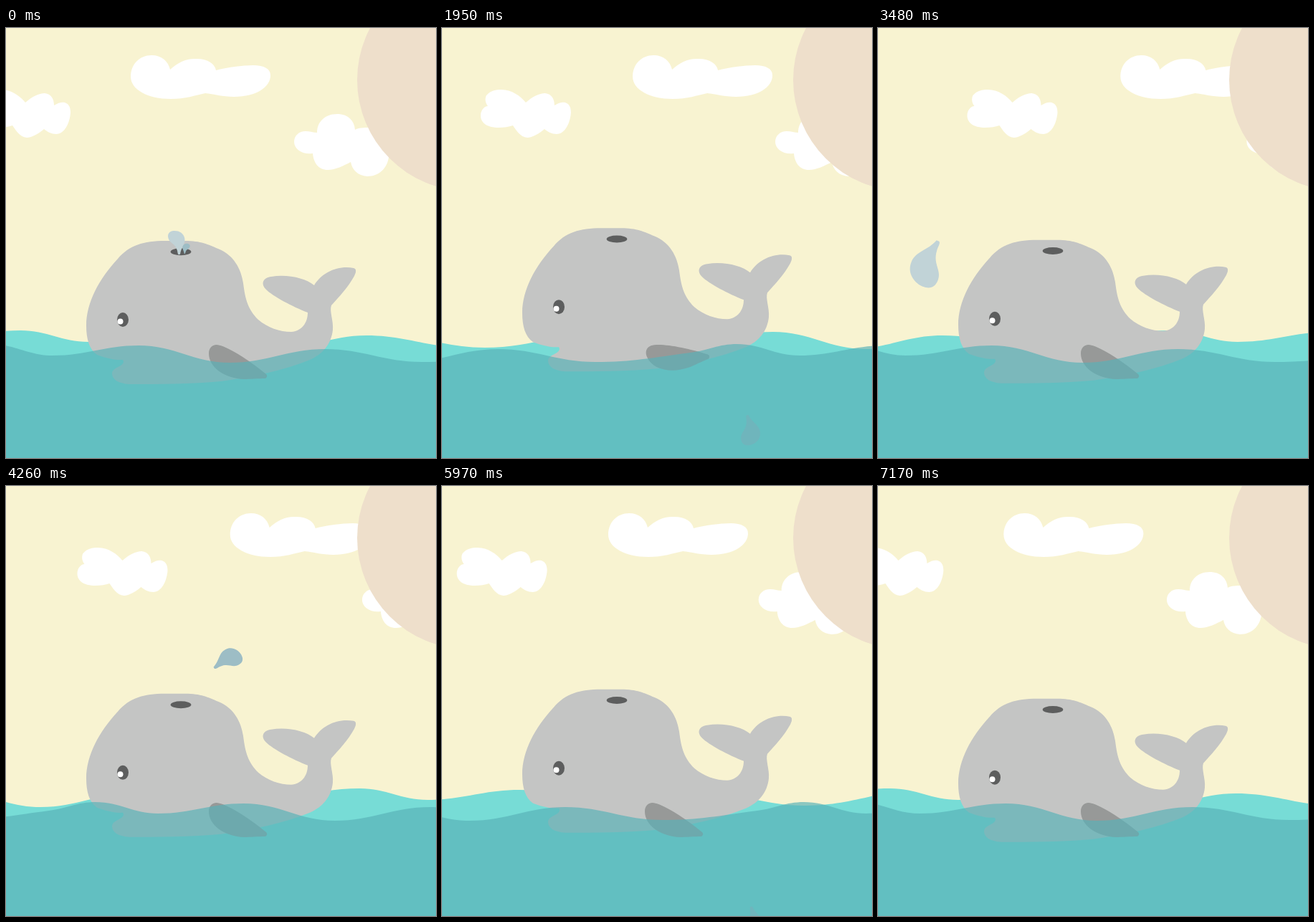
Recreate the animation shown at these times as an HTML page with a canvas. Size 600 px wide and 600 px high, loop 7200 ms.

```html
<!DOCTYPE html>
<html lang="en">
<head>
<meta charset="utf-8">
<title>Whale</title>
<style>
html, body { margin: 0; height: 100%; overflow: hidden; background: #f8f3d1; }
canvas { display: block; width: 100vw; height: 100vh; }
</style>
</head>
<body>
<canvas id="stage" width="600" height="600"></canvas>
<script>
const ctx = document.getElementById('stage').getContext('2d');
const LOOP = 7200, FLIGHT = 900, TILE = 800;

const clouds = [
  { speed: .0461, x: -90, path: 'M64 109C60 104 60 98 62 94C68 87 75 86 83 86C97 86 110 95 117 104C126 96 136 91 144 91C153 92 157 99 157 108C163 104 168 103 172 104C178 106 180 111 180 118C179 132 172 148 160 148C153 148 148 145 143 141C136 147 126 153 119 153C109 152 104 143 99 136C93 138 87 139 79 139C64 139 54 133 54 122C54 115 59 109 64 109Z' },
  { speed: .0472, x: 0, path: 'M174 68C174 50 187 38 203 38C217 38 226 46 229 58C240 48 252 42 266 43C282 43 291 50 293 59C308 55 330 52 345 52C360 52 369 57 369 66C369 82 350 96 318 96C302 96 290 92 278 91C264 94 250 99 230 99C198 99 174 86 174 68Z' },
  { speed: .0323, x: 0, path: 'M402 159C402 150 409 144 418 144C424 144 429 146 434 146C434 131 445 120 462 120C477 120 486 129 487 142C492 139 499 139 506 139C522 140 536 160 534 180C532 196 520 207 504 207C491 206 483 198 481 187C471 192 460 198 449 198C436 198 429 188 428 175C412 177 402 168 402 159Z' }
].map(c => ({ ...c, path: new Path2D(c.path) }));

const body = new Path2D('M112 415C112 383 130 350 156 322C172 303 192 297 222 297L250 297C272 297 282 302 296 308C318 317 328 336 331 356C334 380 338 393 352 407C365 418 382 424 398 424C412 423 421 412 421 397C400 389 372 374 363 365C354 356 360 348 370 347C392 343 418 349 430 359C441 341 463 331 485 335C489 336 489 340 486 346C478 361 464 376 454 387C451 395 457 408 456 421C454 441 442 455 424 463C390 477 345 487 300 493C260 497 210 497 172 497C156 496 148 490 148 482C148 476 155 474 160 471Q166 467 163 463C150 464 135 459 127 456C116 448 112 434 112 415Z');
const fin = new Path2D('M283 454C283 447 287 442 294 442C308 443 340 464 363 483Q366 486 362 489C352 489 340 490 332 490C306 489 283 474 283 454Z');
const drop = new Path2D('M0 -2C18 -8 25 -23 41 -23C57 -23 66 -10 67 4C67 16 61 21 51 21C36 21 33 6 14 4C8 3 2 5 0 2Z');

// Crests and troughs of one wave tile; a third value is the slope there.
const backWave = [[20, 422], [115, 438], [245, 424], [375, 448], [503, 429], [643, 446]];
const frontWave = [[65, 457], [185, 443], [312, 467], [445, 448], [580, 466], [713, 453, -.13], [778, 441]];

const left = { size: 1, flip: -1, color: '#c1d3d7', curve: [[242, 316], [215, 185], [55, 103], [30, 620]] };
const right = { size: .63, flip: 1, color: '#9dbdc5', curve: [[249, 315], [270, 240], [390, 136], [435, 620]] };
const spouts = [
  [left, -70], [right, 0], [right, 1099], [left, 2436], [left, 2830],
  [right, 3927], [left, 4700], [right, 5090], [right, 6100]
];

const triangle = (t, period) => Math.min(t % period, period - t % period);

function fill(color, path) {
  ctx.fillStyle = color;
  ctx.fill(path);
}

function ellipse(color, x, y, rx, ry) {
  const p = new Path2D();
  p.ellipse(x, y, rx, ry, 0, 0, 7);
  fill(color, p);
}

function wave(points, shift, color) {
  const p = new Path2D();
  let last;
  for (let k = -2; k < 2; k++) {
    for (const [px, y, slope = 0] of points) {
      const x = px + k * TILE + shift;
      if (last) {
        const h = (x - last.x) * .4;
        p.bezierCurveTo(last.x + h, last.y + h * last.slope, x - h, y - h * slope, x, y);
      } else p.moveTo(x, y);
      last = { x, y, slope };
    }
  }
  p.lineTo(last.x, 600);
  p.lineTo(-2 * TILE, 600);
  fill(color, p);
}

function drawDrop({ size, flip, color, curve }, age, bob) {
  if (age < 0 || age > FLIGHT) return;
  const p = age / FLIGHT, u = Math.max(0, (p - .1) / .9), v = 1 - u;
  const [a, b, c, d] = [0, 1].map(i => i).length && curve;
  const at = i => v ** 3 * (a[i] + i * bob) + 3 * v * v * u * b[i] + 3 * v * u * u * c[i] + u ** 3 * d[i];
  const rate = i => v * v * (b[i] - a[i]) + 2 * v * u * (c[i] - b[i]) + u * u * (d[i] - c[i]);
  const s = size * Math.min(1, .35 + 2 * p);
  ctx.save();
  ctx.translate(at(0), at(1));
  ctx.rotate(Math.atan2(rate(1), rate(0)));
  ctx.scale(s, s * flip);
  fill(color, drop);
  ctx.restore();
}

function draw(now) {
  const t = now % LOOP;
  const bob = -.0108 * triangle(t, 3600);

  ctx.fillStyle = '#f8f3d1';
  ctx.fillRect(0, 0, 600, 600);
  for (const { speed, x, path } of clouds) {
    ctx.save();
    ctx.translate(x + speed * triangle(t, LOOP), 0);
    fill('#fff', path);
    ctx.restore();
  }
  ellipse('#eedfcb', 645, 72.5, 155, 155);
  wave(backWave, t / LOOP * TILE, '#77dcd6');

  ctx.save();
  ctx.translate(0, bob);
  fill('#c4c5c4', body);
  ellipse('#5d5e5e', 163, 407, 8, 10);
  ellipse('#fff', 159.5, 409.5, 4, 4);
  ellipse('#5d5e5e', 244, 312.3, 14.3, 5);
  ctx.restore();

  const flap = Math.max(0, 1 - Math.abs(t % 3600 - 1950) / 400);
  ctx.save();
  ctx.translate(296, 449);
  ctx.rotate(-22 * flap * Math.PI / 180);
  ctx.translate(-296, -449);
  fill('#979998', fin);
  ctx.restore();

  for (const [kind, start] of spouts) drawDrop(kind, t - start, bob);
  wave(frontWave, t % 3600 / 3600 * TILE, 'rgba(88,178,184,.67)');
}

const begin = performance.now();
function tick() {
  draw(performance.now() - begin);
  requestAnimationFrame(tick);
}
tick();
</script>
</body>
</html>
```
